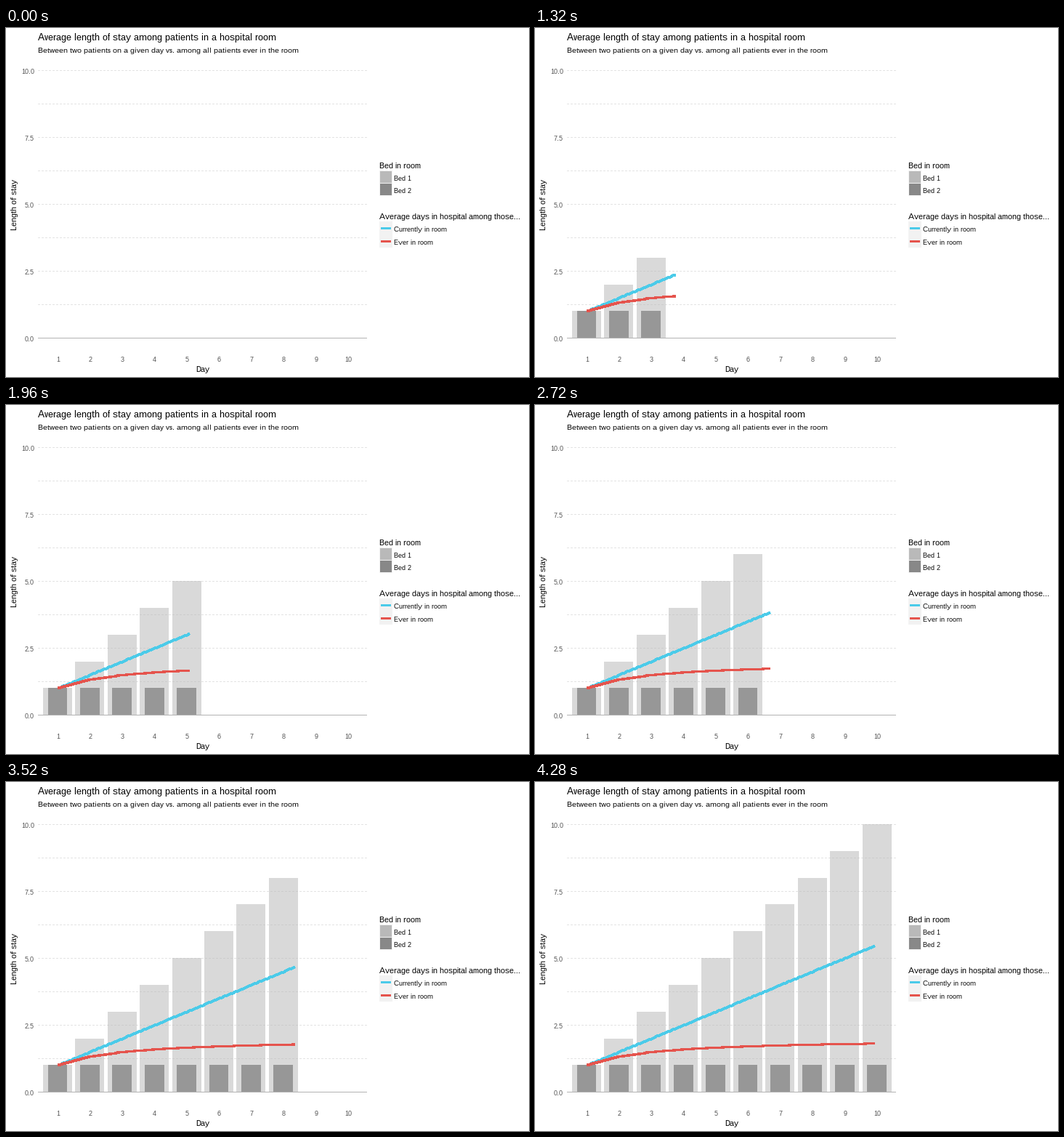
A matplotlib script that plays this animation: 720 px wide and 480 px high, repeating every 4.32 s.

```python
import numpy as np
import matplotlib.pyplot as plt
from matplotlib.animation import FuncAnimation
from matplotlib.patches import Rectangle

W, H, DPI = 720, 480, 72          # at 72 dpi one point is one pixel
FRAMES, INTERVAL = 108, 40
DAYS = np.arange(1, 11)
LEFT, RIGHT = 44, 498
BASE, UNIT = 426.7, 36.82         # zero line and pixels per day of stay
LIGHT, DARK = "#b9b9b9", "#888888"
BLUE, RED = "#4bcbe9", "#e5544d"

# Hinted text with whole-pixel advances and no kerning
plt.rcParams.update({
    "font.family": "Liberation Sans",
    "text.hinting": "native",
    "text.hinting_factor": 1,
    "text.kerning_factor": 6,
})

fig = plt.figure(figsize=(W / DPI, H / DPI), dpi=DPI, facecolor="white")
ax = fig.add_axes([0, 0, 1, 1])
ax.set(xlim=(0, W), ylim=(H, 0))
ax.axis("off")


def day_x(day):
    return 71 + 44.4 * (np.asarray(day) - 1)


def stay_y(days):
    """Pixel row of a length of stay."""
    return np.floor(BASE - UNIT * np.asarray(days))


def label(x, y, text, size, color="black", **kw):
    kw.setdefault("va", "baseline")
    return ax.text(x, y, text, size=size, color=color, **kw)


def box(x0, y0, x1, y1, color, alpha=1, z=2):
    return ax.add_patch(Rectangle((x0, y0), x1 - x0, y1 - y0, fc=color, lw=0,
                                  alpha=alpha, zorder=z, antialiased=False))


def line(x, y, color, width, z, **kw):
    return ax.plot(x, y, color=color, lw=width, zorder=z, antialiased=False,
                   snap=False, solid_capstyle="butt", dash_capstyle="butt",
                   **kw)[0]


def rule(value, right, color, **kw):
    line([LEFT, right], [stay_y(value) + 0.5] * 2, color, 1, 1, **kw)


def bar(day, height, half, color, alpha, z):
    x = float(day_x(day))
    patch = box(round(x - half), stay_y(height), round(x + half), stay_y(0),
                color, alpha, z)
    patch.set_visible(False)
    return patch


# Titles and axes
label(44, 17, "Average length of stay among patients in a hospital room", 13)
label(44, 34, "Between two patients on a given day vs. "
              "among all patients ever in the room", 10)
label(270.5, 473, "Day", 11, ha="center")
label(15, 242.5, "Length of stay", 11, ha="center", rotation=90,
      rotation_mode="anchor")

for v in np.arange(1.25, 10.1, 1.25):
    rule(v, RIGHT, "#e3e3e3", ls=(0, (2, 2)))
rule(0, RIGHT - 1, "#b3b3b3")
for v in np.arange(0, 10.1, 2.5):
    label(39, stay_y(v) + 5, f"{v:.1f}", 9, "#4d4d4d", ha="right")
for d in DAYS:
    label(day_x(d) + 0.5, 459, str(d), 9, "#4d4d4d", ha="center")

# Legends
label(514, 193, "Bed in room", 11)
for y, color, name in [(197, LIGHT, "Bed 1"), (214, DARK, "Bed 2")]:
    box(514, y - 1, 532, y + 17, "#f2f2f2", z=1)
    box(515, y, 531, y + 16, color)
    label(534, y + 13, name, 9)

label(514, 263, "Average days in hospital among those...", 11)
for y, color, name in [(267, BLUE, "Currently in room"),
                       (285, RED, "Ever in room")]:
    box(514, y - 1, 532, y + 17, "#f2f2f2", z=1)
    line([516, 530], [y + 8.5] * 2, color, 3, 3)
    label(534, y + 13, name, 9)

# Moving parts
bars = [(bar(d, d, 20, LIGHT, 0.54, 2), bar(d, 1, 13.3, DARK, 0.81, 3))
        for d in DAYS]
current = line([], [], BLUE, 3, 4)
ever = line([], [], RED, 3, 5)


def update(i):
    path = 1 + np.arange(i + 1) / 12
    for curve, means in [(current, (DAYS + 1) / 2),
                         (ever, 2 * DAYS / (DAYS + 1))]:
        curve.set_data(np.round(day_x(path)) + 0.5,
                       stay_y(np.interp(path, DAYS, means)) + 0.5)
        curve.set_visible(i > 0)
    shown = (i + 1) // 10
    for n, pair in enumerate(bars):
        for patch in pair:
            patch.set_visible(n < shown)
    return [current, ever]


anim = FuncAnimation(fig, update, frames=FRAMES, interval=INTERVAL,
                     init_func=lambda: update(0), repeat=True, repeat_delay=0)
plt.show()
```
